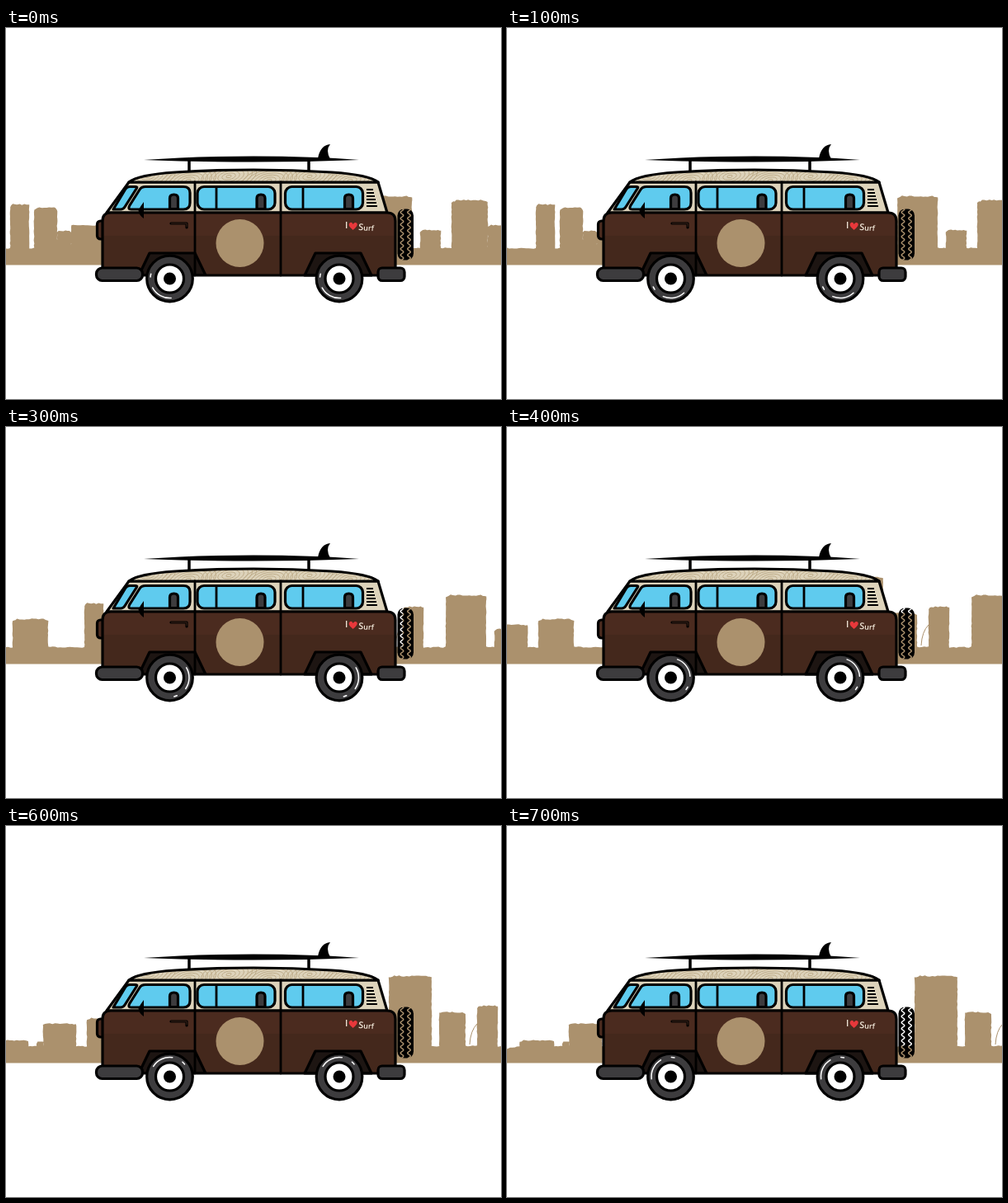
Recreate the animation shown at these times as an HTML page. Size 600 px wide and 450 px high, loop 0.8 s.

```html
<!DOCTYPE html>
<html lang="en">
<head>
<meta charset="utf-8">
<title>Surf van</title>
<style>
  html, body { margin: 0; width: 100%; height: 100%; overflow: hidden; background: #fff; }
  svg { display: block; width: 600px; height: 450px; }
  .o { stroke: #000; stroke-width: 3.2; stroke-linejoin: round; stroke-linecap: round; }
  .n { fill: none; }
  .glass { fill: #5fcbee; }
  .gray { fill: #3d3c3e; }
  .cream { fill: #ddd3bb; }
  .brown { fill: #4b2b1f; }
  .dark { fill: #44281c; }
  .arch { fill: #1d1512; }
  text { font: 600 11px "Open Sans", sans-serif; fill: #f3eadb; }
</style>
</head>
<body>
<svg viewBox="0 0 600 450">
  <defs>
    <path id="roof" d="M149 187Q160 178 205 175Q300 169 395 175Q440 178 451 187Z"/>
    <path id="body" d="M117 234Q117 224 127 224H462Q472 224 472 234V300H117Z"/>
    <clipPath id="roofClip"><use href="#roof"/></clipPath>
    <clipPath id="bodyClip"><use href="#body"/></clipPath>
    <mask id="treads">
      <rect x="470" y="215" width="30" height="72" fill="#fff"/>
      <path id="waves" fill="none" stroke="#000" stroke-width="1.5"/>
    </mask>
    <path id="shine" class="n" stroke="#fff" stroke-width="1.5" stroke-linecap="round"/>
    <g id="wheel">
      <circle r="27.8" class="o gray"/>
      <circle r="17" class="o" fill="#fff"/>
      <circle r="7.5"/>
      <use href="#shine"/>
    </g>
    <g id="pane">
      <rect class="o glass" width="94" height="27.500" rx="8"/>
      <path class="o gray" d="M72 27V14Q72 9.500 77 9.500Q82 9.500 82 14V27Z"/>
    </g>
    <path id="arch" class="o arch" d="M0 27L13 0H68L81 27Z"/>
  </defs>

  <g id="city" fill="#ab916d">
    <path id="skyline"/>
    <path d="M382 265Q383 248 391 240" fill="none" stroke="#ab916d"/>
  </g>

  <rect x="474.500" y="219.500" width="19.500" height="62" rx="8" mask="url(#treads)"/>

  <!-- board and rack -->
  <path d="M222 160V175M367 160V175" stroke="#000" stroke-width="3.500"/>
  <path d="M167 160Q230 155.500 300 155.500Q372 155.500 428 160Q300 165 167 160Z"/>
  <path d="M378 158Q381 142 393 141Q387 148 393 159Z"/>

  <!-- cabin -->
  <path class="o cream" d="M149 187L122 224H462L451 187Z"/>
  <use href="#roof" class="cream"/>
  <path id="grain" class="n" clip-path="url(#roofClip)" stroke="#bba985" stroke-width=".9"/>
  <use href="#roof" class="o n"/>

  <g class="o glass">
    <path d="M130 220L145 195Q147 192.500 150 192.500H157Q160 192.500 158 195L144 217Q142 220 139 220Z"/>
    <path d="M152 220Q147 220 150 215L162 196Q164 192.500 169 192.500H215Q223 192.500 223 200V212Q223 220 215 220Z"/>
  </g>
  <path class="o gray" d="M198.500 219.500V206.500Q198.500 202 203.500 202Q208.500 202 208.500 206.500V219.500Z"/>
  <use href="#pane" x="232" y="192.500"/>
  <use href="#pane" x="338.500" y="192.500"/>
  <path d="M255 193V220M360 193V220" stroke="#000" stroke-width="2.800"/>
  <path id="vent" stroke="#000" stroke-width="2.200"/>

  <!-- lower body -->
  <rect class="o brown" x="110.500" y="234" width="12" height="22" rx="4"/>
  <g clip-path="url(#bodyClip)">
    <rect class="brown" x="117" y="224" width="355" height="28"/>
    <rect class="dark" x="117" y="252" width="355" height="48"/>
    <use href="#arch" x="161" y="273"/>
  </g>
  <use href="#arch" x="362" y="273"/>
  <use href="#body" class="o n"/>
  <path class="o n" d="M229 187V300M333 187V300" style="stroke-width:2.800"/>
  <path class="o n" d="M200 237H219V242"/>
  <path class="n" d="M200 237H219V241" stroke="#4b2b1f" stroke-width=".8"/>
  <path d="M167 211V231Q161 227 160.500 221Q163 216 167 211Z"/>
  <circle cx="283.500" cy="261" r="29" fill="#ab916d"/>

  <text x="411" y="243" font-style="italic">I</text>
  <path d="M420.500 245Q413 239 417 236Q419.500 235 420.500 238Q423 234.500 425.500 237Q427 240 420.500 245Z" fill="#e8383b"/>
  <text x="427" y="245" transform="rotate(4 427 245)">S<tspan style="font-size:9px">urf</tspan></text>

  <rect class="o gray" x="109.500" y="291" width="56" height="15.500" rx="7"/>
  <rect class="o gray" x="451" y="291" width="32" height="15.500" rx="5"/>

  <use href="#wheel" x="198.500" y="304"/>
  <use href="#wheel" x="404" y="304"/>
</svg>
<script>
const $ = id => document.getElementById(id);
const setPath = (id, d) => $(id).setAttribute("d", d);
const STEP = 100, LOOP = 800, GROUND = 267;

let seed = 7;
const rnd = () => (seed = seed * 16807 % 2147483647) / 2147483647;
const jitter = a => (rnd() * 2 - 1) * a;

// Buildings: left edge, width, roof height.
const buildings = [
  [-195, 42, 260], [-143, 8, 262], [-135, 40, 240], [-82, 43, 233],
  [5, 23, 214], [34, 28, 218], [62, 17, 246], [79, 40, 239],
  [284, 52, 182], [345, 32, 226], [391, 25, 218], [443, 49, 204],
  [502, 25, 245], [540, 44, 209], [584, 30, 239]
];

// Extends a path from the last point to (x, y) with an uneven edge.
let city = "M-215 287.5", penX = -215, penY = 287;
function roughTo(x, y) {
  const n = Math.ceil(Math.hypot(x - penX, y - penY) / 3);
  for (let i = 1; i <= n; i++) {
    const px = penX + (x - penX) * i / n, py = penY + (y - penY) * i / n;
    city += `L${px + jitter(.4)} ${py + jitter(.7)}`;
  }
  [penX, penY] = [x, y];
}
roughTo(-215, GROUND + 4);
for (const [x, w, top] of buildings) {
  const notch = w / 8;
  roughTo(x, GROUND);
  roughTo(x, top + 3 * rnd());
  roughTo(x + notch, top);
  roughTo(x + w - notch, top);
  roughTo(x + w, top + 3 * rnd());
  roughTo(x + w, GROUND);
}
setPath("skyline", city + "V287.5Z");

let waves = "";
for (const x of [480, 488.5]) {
  waves += `M${x} 219`;
  for (let y = 220; y <= 282; y++) waves += `L${x - 1.8 * Math.sin(y * .85)} ${y}`;
}
setPath("waves", waves);

// Wood grain: nested knots along the roof.
let grain = "";
for (let k = 0; k < 6; k++) {
  const x = 172 + k * 49, y = 180 + k % 2 * 5;
  for (let r = 2; r < 22; r += 3.2)
    for (const side of [-1, 1])
      grain += `M${x - r * 1.5} ${y}a${r * 1.5} ${r * .7} -12 0 ${side > 0 ? 1 : 0} ${r * 3} 0`;
}
setPath("grain", grain);

let vent = "";
for (let i = 0; i < 6; i++) vent += `M437 ${196 + 4 * i}h${8 + i}`;
setPath("vent", vent);

const onRim = deg => {
  const a = deg * Math.PI / 180;
  return `${23.5 * Math.cos(a)} ${23.5 * Math.sin(a)}`;
};
const arc = (a, b) => `M${onRim(a)}A23.5 23.5 0 0 1 ${onRim(b)}`;
setPath("shine", arc(-33, 33) + arc(66, 75));

function draw() {
  const step = Math.floor(performance.now() % LOOP / STEP);
  $("city").setAttribute("transform", `translate(${30 * step} 0)`);
  $("shine").setAttribute("transform", `rotate(${119 - 39 * step})`);
  requestAnimationFrame(draw);
}
draw();
</script>
</body>
</html>
```
